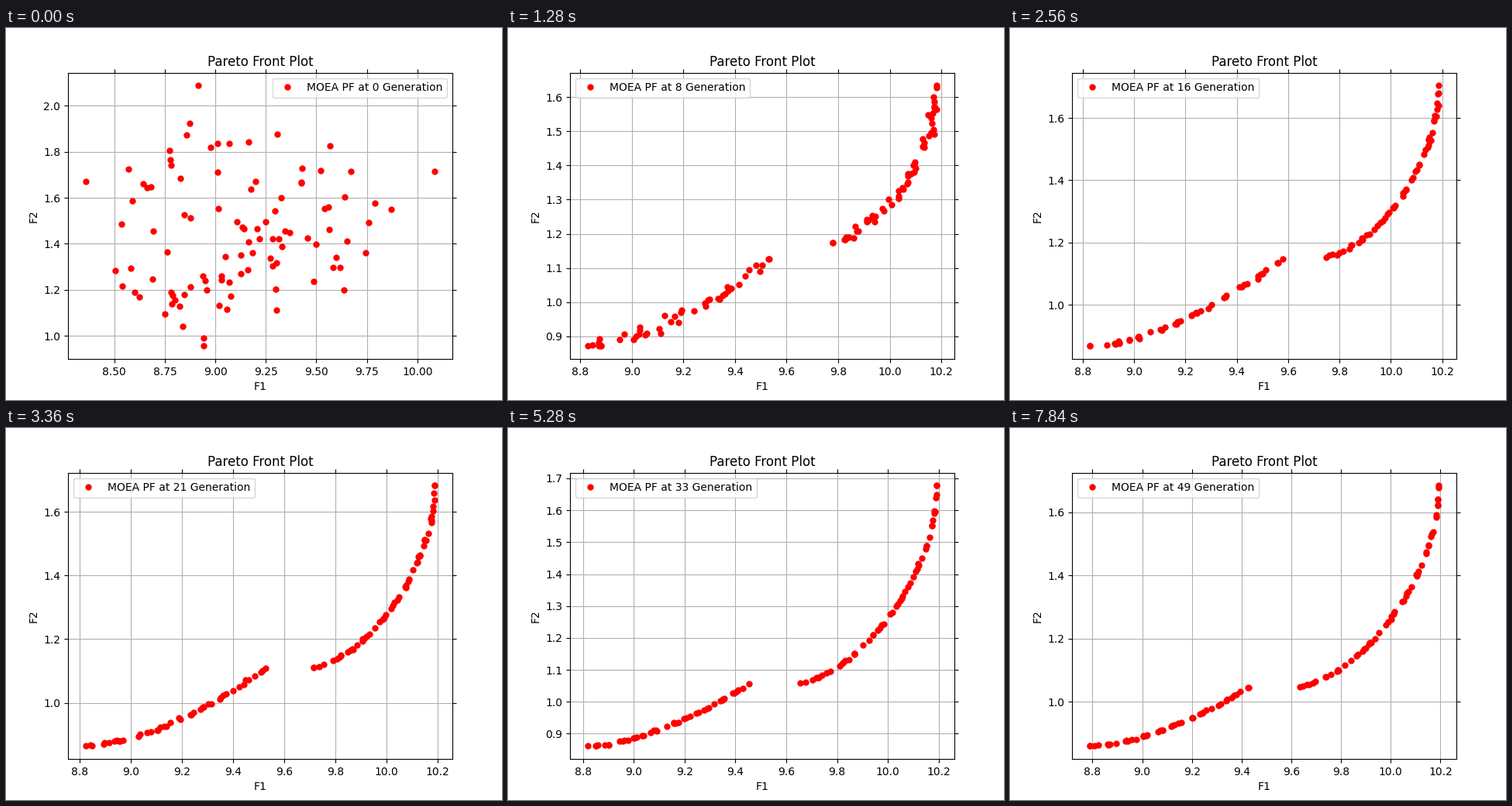
A matplotlib script that plays this animation: 640 px wide and 480 px high, repeating every 8 s.

```python
import matplotlib.pyplot as plt
import numpy as np
from matplotlib.animation import FuncAnimation

GENERATIONS = 50
INTERVAL = 160
LOW_N, HIGH_N = 44, 56   # members on each side of the gap
FORMED = 4               # generation at which the cloud has become a front

# Outermost members of the first population: left, right, top, bottom.
HULL = [(8.357, 1.672), (10.087, 1.714), (8.915, 2.088), (8.942, 0.955)]

# Ends of both branches: generation, low start, low end, high start, high end.
ENDS = np.array([
    (4, 8.597, 0.913, 9.598, 1.233, 9.771, 1.236, 10.156, 1.771),
    (8, 8.828, 0.871, 9.533, 1.126, 9.779, 1.175, 10.183, 1.634),
    (16, 8.827, 0.867, 9.579, 1.147, 9.748, 1.152, 10.187, 1.704),
    (26, 8.819, 0.861, 9.478, 1.069, 9.682, 1.071, 10.192, 1.661),
    (39, 8.817, 0.861, 9.432, 1.045, 9.631, 1.050, 10.194, 1.691),
    (49, 8.788, 0.859, 9.430, 1.045, 9.634, 1.048, 10.194, 1.685),
])


def low_shape(u):
    return u ** 1.64


def high_shape(u):
    return 1 - (1 - u ** 1.5) ** 0.55


def cloud():
    """Random first population between a V-shaped floor and a sloping roof."""
    rng = np.random.default_rng(7)
    n = LOW_N + HIGH_N - len(HULL)
    x = 8.42 + 1.55 * rng.beta(1.8, 2.1, n)
    floor = 0.97 + 0.33 * abs(x - 8.95)
    roof = 2.05 - 0.3 * abs(x - 8.9)
    y = floor + (roof - floor) * rng.beta(1.3, 1.7, n)
    pts = np.vstack([HULL, np.column_stack([x, y])])
    return pts[np.argsort(pts[:, 0])]


def branch(shape, start, end, n, gen, rng):
    """Place n members along one branch; clumps and scatter fade with time."""
    u = 1 - (1 - np.linspace(0, 1, 400)) ** 3
    curve = start + (end - start) * np.column_stack([u, shape(u)])
    s = np.concatenate([[0], np.cumsum(np.hypot(*np.diff(curve, axis=0).T))])
    at = np.linspace(0, 1, n)
    at[1:-1] += rng.uniform(-1, 1, n - 2) * (1 + 20 / gen) / n
    at = np.sort(np.clip(at, 0, 1)) * s[-1]
    pts = np.column_stack([np.interp(at, s, c) for c in curve.T])
    pts[1:-1] += rng.normal(0, 0.32 / gen ** 1.8 + 0.001, (n - 2, 2))
    return np.clip(pts, start, end)


def front(gen):
    rng = np.random.default_rng(100 + gen)
    ends = [np.interp(gen, ENDS[:, 0], col) for col in ENDS[:, 1:].T]
    a, b, c, d = np.reshape(ends, (4, 2))
    return np.vstack([branch(low_shape, a, b, LOW_N, gen, rng),
                      branch(high_shape, c, d, HIGH_N, gen, rng)])


def population(gen):
    if gen >= FORMED:
        return front(gen)
    t = (gen / FORMED) ** 0.6
    return (1 - t) * cloud() + t * front(FORMED)


fig, ax = plt.subplots(figsize=(6.4, 4.8), dpi=100)


def draw(gen):
    ax.clear()
    x, y = population(gen).T
    ax.plot(x, y, "ro", markersize=5, label=f"MOEA PF at {gen} Generation")
    ax.set_title("Pareto Front Plot")
    ax.set_xlabel("F1")
    ax.set_ylabel("F2")
    ax.tick_params(top=True, right=True)
    ax.grid(True)
    ax.legend(loc="best")
    return []


anim = FuncAnimation(fig, draw, frames=GENERATIONS, init_func=lambda: [],
                     interval=INTERVAL, repeat=True, repeat_delay=0)
plt.show()
```
